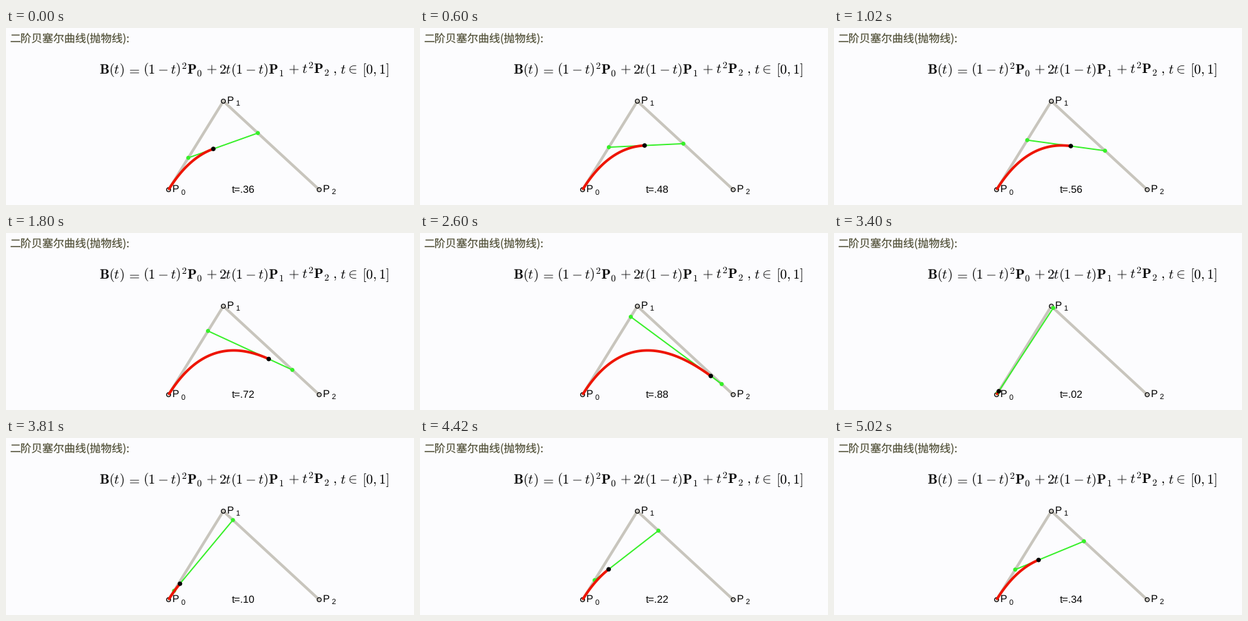
A matplotlib script that plays this animation: 596x260 px, repeating every 5.22 s.

```python
import numpy as np
import matplotlib.pyplot as plt
from matplotlib.animation import FuncAnimation
from matplotlib.patches import Circle

W, H, DPI = 596, 260, 100
PX = 72 / DPI  # points per pixel
LOOP, TICK = 5220, 20

plt.rcParams["mathtext.fontset"] = "cm"
plt.rcParams["text.hinting"] = "none"

GREY, GREEN, RED, OLIVE = "#c8c5bd", "#36f028", "#ee1400", "#55543c"
P0, P1, P2 = np.array([[237.5, 237.5], [317.5, 107.5], [457.5, 237.5]])

# Start time of each pose in ms
STARTS = [0, 200, 400, 600, 820, 1020, 1220, 1400, 1600, 1800, 2020, 2220, 2420,
          2600, 2800, 3000, 3200, 3400, 3600, 3810, 4010, 4210, 4420, 4620,
          4820, 5020]

fig = plt.figure(figsize=(W / DPI, H / DPI), dpi=DPI, facecolor="#fcfcfe")
ax = fig.add_axes([0, 0, 1, 1])
ax.set_xlim(0, W)
ax.set_ylim(H, 0)
ax.axis("off")


def text(x, y, s, size, font="Liberation Sans", color="black", ha="left"):
    return ax.text(x, y, s, fontsize=size * PX, family=font, color=color,
                   ha=ha, va="baseline", zorder=9)


def line(points, color, width, z, cap="round"):
    xs, ys = np.transpose(points)
    return ax.plot(xs, ys, color=color, lw=width * PX, zorder=z,
                   solid_capstyle=cap, solid_joinstyle="round")[0]


def dot(center, radius, face, z, edge="none", width=0):
    return ax.add_patch(Circle(center, radius, facecolor=face, edgecolor=edge,
                               lw=width * PX, zorder=z))


def formula():
    parts = [
        (136, r"\mathbf{B}(t)", "left"),
        (186, "=", "center"),
        (200, r"(1-t)^2\mathbf{P}_0", "left"),
        (300, "+", "center"),
        (311, r"2t(1-t)\mathbf{P}_1", "left"),
        (420, "+", "center"),
        (432, r"t^2\mathbf{P}_2", "left"),
        (477, ",", "left"),
        (488, "t", "left"),
        (505, r"\in", "center"),
        (559.5, "[0,1]", "right"),
    ]
    for x, s, ha in parts:
        text(x, 66.5, f"${s}$", 20, ha=ha)


text(5, 21, "二阶贝塞尔曲线(抛物线):", 16, "Noto Sans CJK JP", OLIVE)
formula()

line([P0, P1, P2], GREY, 4, 1)
for i, p in enumerate((P0, P1, P2)):
    dot(p, 3, "none", 2, "black", 1.2)
    text(p[0] + 5.5, p[1] + 3.5, "P", 15)
    text(p[0] + 18, p[1] + 7, str(i), 11)

chord = line([P0, P1], GREEN, 1.9, 3)
curve = line([P0, P0], RED, 3.8, 5, "butt")
ends = [dot(P0, 3, GREEN, 4), dot(P1, 3, GREEN, 4)]
tip = dot(P0, 3.3, "black", 6)
label = text(329.5, 242, "", 15)


def mix(a, b, t):
    return a + (b - a) * t


def bezier(t):
    return mix(mix(P0, P1, t), mix(P1, P2, t), t)


def update(frame):
    step = np.searchsorted(STARTS, frame * TICK + TICK / 2, side="right") - 1
    t = (18 + 2 * step) % 51 / 50
    a, b = mix(P0, P1, t), mix(P1, P2, t)
    chord.set_data(*np.transpose([a, b]))
    ends[0].center, ends[1].center = a, b
    curve.set_data(*bezier(np.linspace(0, t, 60)[:, None]).T)
    tip.center = bezier(t)
    label.set_text(f"t={t:.2f}".replace("0.", "."))
    return [chord, curve, *ends, tip, label]


anim = FuncAnimation(fig, update, frames=LOOP // TICK, interval=TICK,
                     repeat=True, repeat_delay=0, blit=False)
plt.show()
```
